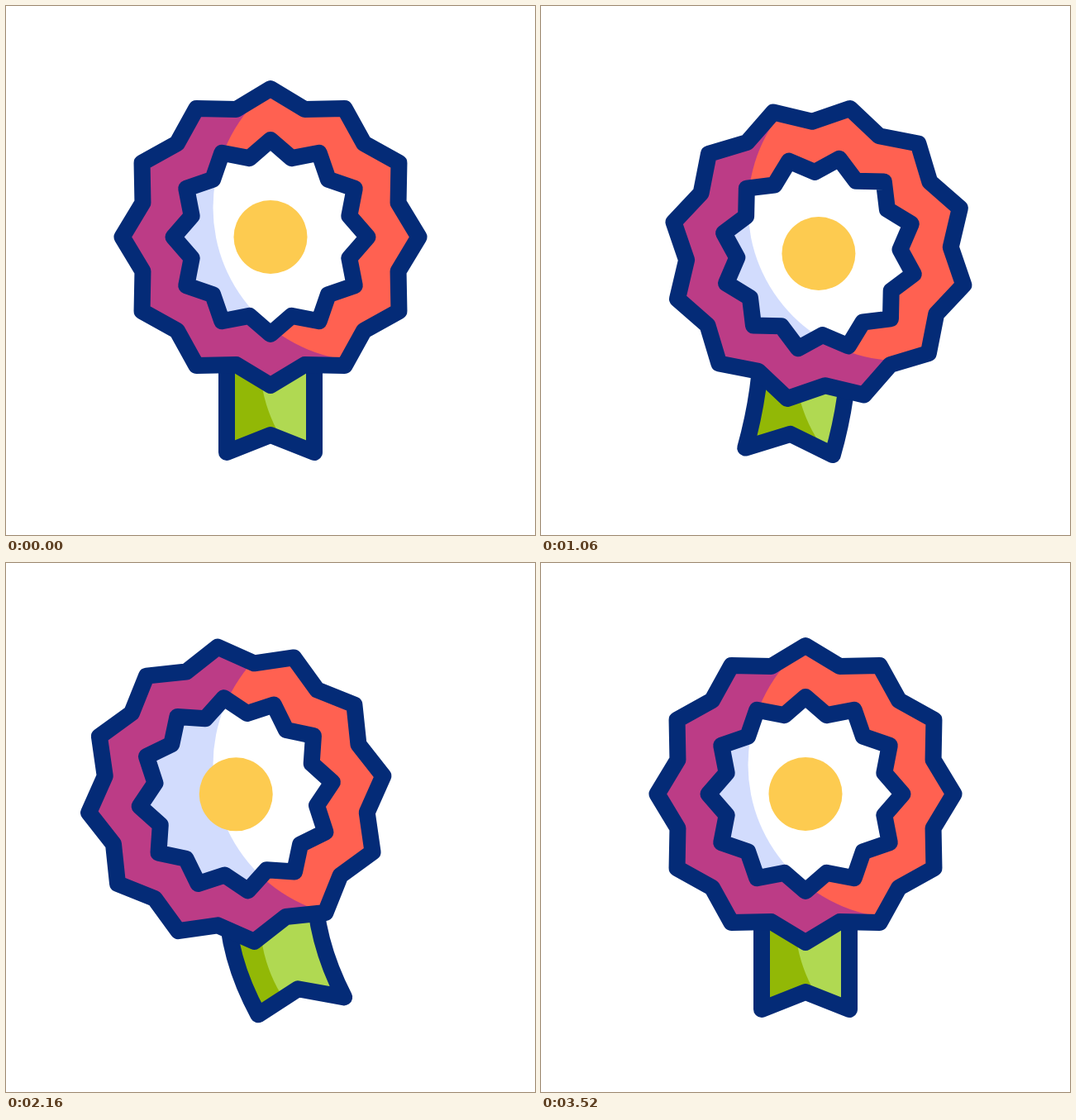
An HTML page with a canvas for the animation above (3.6 s loop, 640 by 640 pixels).

```html
<!DOCTYPE html>
<html lang="en">
<head>
<meta charset="utf-8">
<title>Rosette</title>
<style>
  html, body { margin: 0; height: 100%; overflow: hidden; background: #fff; }
  canvas { display: block; width: 640px; height: 640px; }
</style>
</head>
<body>
<canvas id="stage" width="640" height="640"></canvas>
<script>
const ctx = document.getElementById('stage').getContext('2d');
const LOOP = 3600;
const rad = degrees => degrees * Math.PI / 180;

// Sine easing between turning points given as [time, value]
function swing(...points) {
  return time => {
    const next = points.findIndex(([t]) => t > time);
    if (next < 0) return points[points.length - 1][1];
    const [t0, from] = points[next - 1], [t1, to] = points[next];
    const eased = (1 - Math.cos(Math.PI * (time - t0) / (t1 - t0))) / 2;
    return from + (to - from) * eased;
  };
}

const headX = swing([0, 320], [440, 275], [1330, 352], [1440, 352], [2270, 275], [2680, 320]);
const headY = swing([0, 279.5], [440, 275.5], [1060, 299.5], [1370, 276], [1840, 298],
  [2300, 275], [2680, 284], [3200, 279.5]);
const headTilt = swing([0, 0], [150, -3], [1060, 12.2], [2010, -8.8], [2680, 5.4], [3520, 0]);
const ribbonSway = swing([0, 0], [440, 44], [1500, -57], [2270, 42], [2680, -42], [3200, 13], [3520, 0]);

function circle(x, y, r, color) {
  ctx.fillStyle = color;
  ctx.beginPath();
  ctx.arc(x, y, r, 0, 2 * Math.PI);
  ctx.fill();
}

// The light stays still while the shape moves through it
function paint(path, dark, light, lightX, lightY, lightR) {
  ctx.save();
  ctx.clip(path);
  ctx.fillStyle = dark;
  ctx.fill(path);
  circle(lightX, lightY, lightR, light);
  ctx.restore();
  ctx.stroke(path);
}

function star(x, y, tilt, tip, notch) {
  const path = new Path2D();
  for (let i = 0; i < 24; i++) {
    const a = rad(i * 15 + tilt);
    const r = i % 2 ? notch : tip;
    path.lineTo(x + r * Math.sin(a), y - r * Math.cos(a));
  }
  path.closePath();
  return path;
}

// Both sides hang straight from the head and bend towards the tilted end
function ribbon(sway) {
  const a = rad(-sway * (sway > 0 ? 0.307 : 0.228));
  const cos = Math.cos(a), sin = Math.sin(a);
  const at = (x, y) => [320 + sway + x * cos - y * sin,
                        540 - sway * sway * 0.003 + x * sin + y * cos];
  const [leftX, leftY] = at(-53, 0), [rightX, rightY] = at(53, 0);
  const path = new Path2D();
  path.moveTo(267, leftY - 140);
  path.quadraticCurveTo(267, leftY - 70, leftX, leftY);
  path.lineTo(...at(0, -21));
  path.lineTo(rightX, rightY);
  path.quadraticCurveTo(373, rightY - 70, 373, rightY - 140);
  path.closePath();
  return path;
}

function draw() {
  const time = performance.now() % LOOP;
  const x = headX(time), y = headY(time), tilt = headTilt(time);
  ctx.fillStyle = '#fff';
  ctx.fillRect(0, 0, 640, 640);
  ctx.strokeStyle = '#042b77';
  ctx.lineWidth = 20;
  ctx.lineJoin = 'round';
  paint(ribbon(ribbonSway(time)), '#92b806', '#b0d952', 485.5, 430, 178.3);
  paint(star(x, y, tilt, 179.5, 160), '#bc3c86', '#ff6151', 436, 244, 185.5);
  paint(star(x, y, tilt, 117.5, 98.7), '#d2dcfd', '#fff', 436, 244, 185.5);
  circle(x, y, 44.5, '#fdcb50');
  requestAnimationFrame(draw);
}
draw();
</script>
</body>
</html>
```
